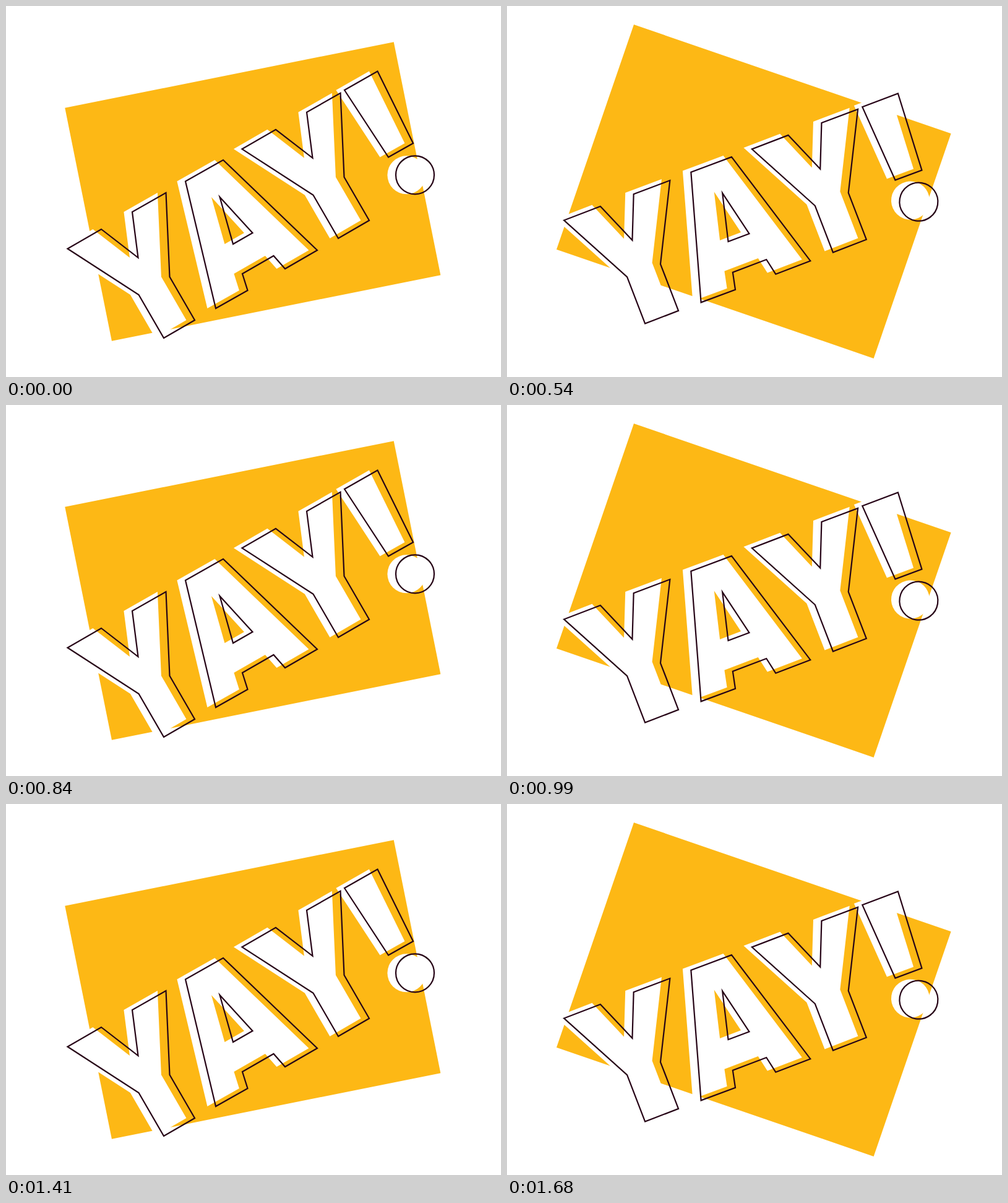
An HTML page that plays this animation: 800 px wide and 600 px high, repeating every 1710 ms.

```html
<!DOCTYPE html>
<html lang="en">
<head>
<meta charset="utf-8">
<title>Yay!</title>
<style>
  html, body { margin: 0; width: 100%; height: 100%; overflow: hidden; background: #fff; }
  svg { display: block; width: 100%; height: 100%; }
</style>
</head>
<body>
<svg viewBox="0 0 800 600" role="img" aria-label="YAY!">
  <defs>
    <path id="y" d="M154 361 213.5 407 204 333 258.5 302 264.5 438 305 508 255 537 214.5 467 99.5 392.5Z"/>
    <path id="a" fill-rule="evenodd" d="M351 249 503 395 451 425 432.5 404 382 433 390.5 460 339 489 290 283.5Z
      M345.5 309 398.5 367 367 385Z"/>
    <g id="word">
      <use href="#y"/>
      <use href="#a"/>
      <use href="#y" x="282" y="-161.2"/>
      <path d="M547 136 600.5 105.5 658 222 618 244.5Z"/>
      <circle cx="661" cy="273.3" r="31"/>
    </g>
  </defs>
  <rect id="card" x="127.8" y="107.75" width="542" height="384.5" fill="#fdb815"/>
  <g id="lettering">
    <use href="#word" x="-13.6" fill="#fff"/>
    <use href="#word" fill="none" stroke="#260416" stroke-width="2.2" stroke-miterlimit="10"/>
  </g>
</svg>
<script>
  const card = document.getElementById('card');
  const lettering = document.getElementById('lettering');
  const PERIOD = 570;
  const FIRST_HOLD = 300;
  const poses = [
    { card: -11.35, lettering: 0 },
    { card: 18.97, lettering: 9 }
  ];

  const rotate = (node, angle, x, y) =>
    node.setAttribute('transform', `rotate(${angle} ${x} ${y})`);

  function draw(ms) {
    const pose = poses[ms % PERIOD < FIRST_HOLD ? 0 : 1];
    rotate(card, pose.card, 398.8, 300);
    rotate(lettering, pose.lettering, 387.6, 322.8);
  }

  const start = performance.now();
  function tick() {
    draw(performance.now() - start);
    requestAnimationFrame(tick);
  }
  tick();
</script>
</body>
</html>
```
